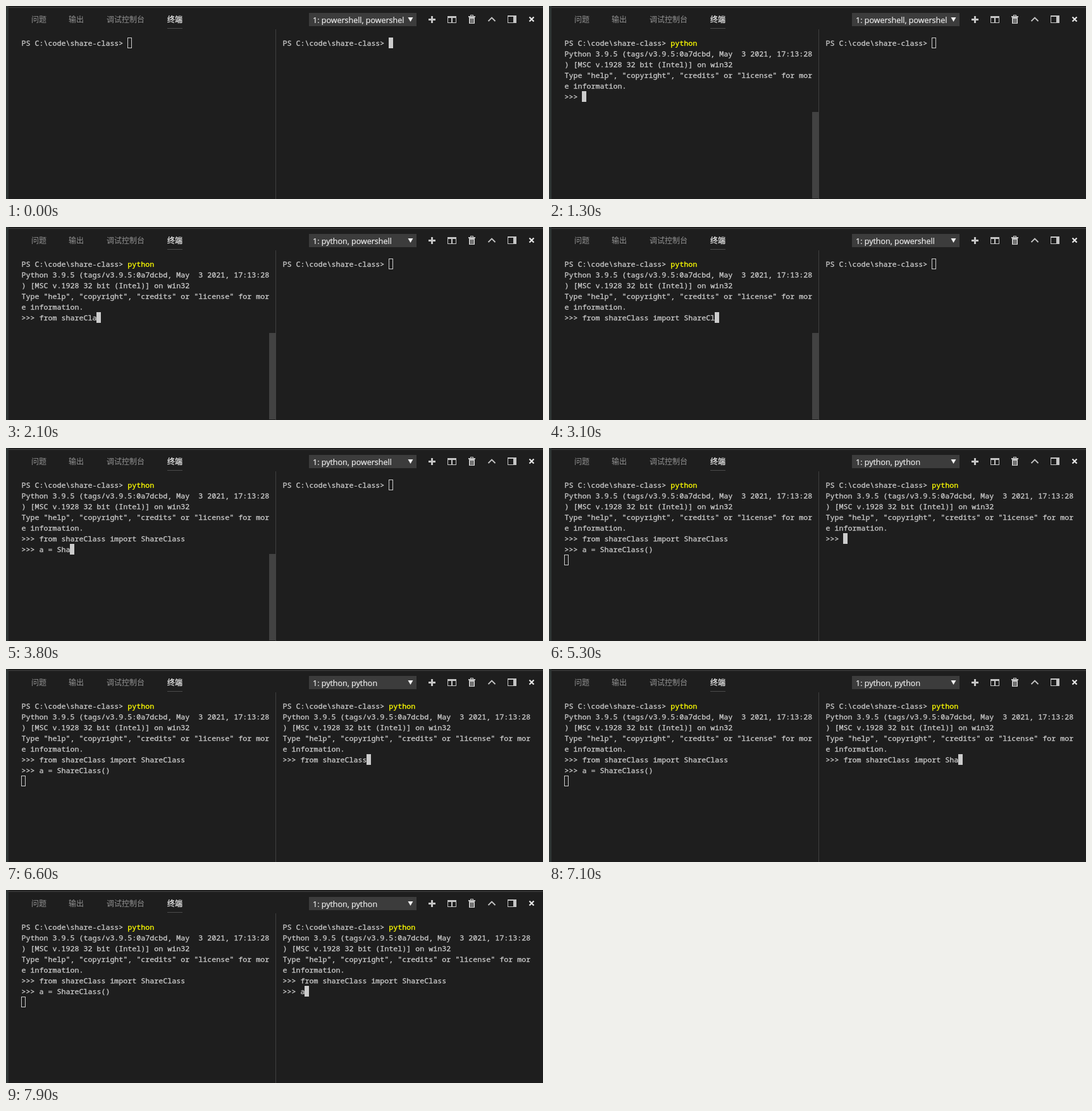
Write an HTML page that moves like this. It is 849 px wide and 306 px high and loops after 8000 ms.

```html
<!DOCTYPE html>
<html lang="zh">
<head>
<meta charset="utf-8">
<title>Split terminal</title>
<style>
html, body { margin: 0; width: 100%; height: 100%; overflow: hidden; background: #1e1e1e; }
svg { position: absolute; left: 0; top: 0; }
.tabs { font: 12px "Noto Sans CJK SC", "Noto Sans CJK", "Noto Sans CJK JP", sans-serif; fill: #929292; }
.tabs .on { fill: #e7e7e7; stroke: #e7e7e7; stroke-width: .3px; }
#title {
  font: 12.5px "Open Sans", "Noto Sans", sans-serif;
  fill: #f0f0f0; stroke: #f0f0f0; stroke-width: .2px;
}
.pane {
  position: absolute; top: 50px; margin: 0; width: 400px; height: 256px;
  font: 11.6667px/17px "Noto Sans Mono", "DejaVu Sans Mono", monospace;
  color: #ccc; white-space: pre; font-variant-ligatures: none;
  -webkit-text-stroke: .3px currentColor;
}
.pane span, .pane b { position: relative; left: .5px; }
.pane b { font-weight: normal; color: #ff0; }
.pane i {
  display: inline-block; vertical-align: top; box-sizing: border-box;
  width: 7px; height: 17px; border: 1px solid #ccc;
}
.pane.focus i { background: #ccc; }
#left { left: 24px; }
#right { left: 437px; }
#bar { position: absolute; left: 416px; top: 168px; width: 10px; height: 137px; background: #424242; }
</style>
</head>
<body>
<svg width="849" height="306" viewBox="0 0 849 306">
  <rect width="4" height="306" fill="#2f3534"/>
  <path d="M4 2h845v1H4zM426 37h1v269h-1z" fill="#414141"/>
  <g class="tabs">
    <text x="40" y="25.5">问题</text>
    <text x="99" y="25.5">输出</text>
    <text x="159" y="25.5">调试控制台</text>
    <text x="255" y="25.5" class="on">终端</text>
  </g>
  <rect x="255" y="35" width="24" height="1" fill="#4b4b4b"/>
  <rect x="479" y="11" width="170" height="21" fill="#3c3c3c"/>
  <clipPath id="clip"><rect x="479" y="11" width="151" height="21"/></clipPath>
  <g clip-path="url(#clip)"><text id="title" x="485" y="27"></text></g>
  <path d="M635.5 18h8l-4 7z" fill="#f0f0f0"/>
  <g fill="#c5c5c5" fill-rule="evenodd">
    <path d="M672 16h3v4h4v3h-4v4h-3v-4h-4v-3h4z"/>
    <path d="M698 16h14v11h-14zM699 19v7h5v-7zM706 19v7h5v-7z"/>
    <path d="M734 14h5v2h3v2h-1v10h-9v-10h-1v-2h3zM735 15v1h3v-1zM734 20v7h1v-7zM736 20v7h1v-7zM738 20v7h1v-7z"/>
    <path d="M793 15h14v12h-14zM794 17v9h8v-9z"/>
  </g>
  <path d="M762.5 24l5.5-5.5 5.5 5.5" fill="none" stroke="#c5c5c5" stroke-width="1.9"/>
  <path d="M827.5 17.5l7 7m0-7l-7 7" stroke="#e8e8e8" stroke-width="2.2"/>
</svg>
<div id="bar"></div>
<pre class="pane" id="left"><span></span><b></b><span></span><i></i></pre>
<pre class="pane" id="right"><span></span><b></b><span></span><i></i></pre>
<script>
const LOOP = 8000;
const TICK = 100;
const SPEED = 2.4; // characters per tick
const PROMPT = 'PS C:\\code\\share-class> ';
const BANNER = `
Python 3.9.5 (tags/v3.9.5:0a7dcbd, May  3 2021, 17:13:28
) [MSC v.1928 32 bit (Intel)] on win32
Type "help", "copyright", "credits" or "license" for mor
e information.
>>> `;

// Bursts of [start time, text]; output, which opens with a newline, appears at once.
const left = {
  el: document.getElementById('left'),
  command: [[1000, 'py'], [1200, 'thon']],
  session: [
    [1300, BANNER],
    [1500, 'from shareC'], [2100, 'lass '], [2400, 'import Share'], [3100, 'Class'],
    [3400, '\n>>> '],
    [3500, 'a = S'], [3800, 'ha'], [4000, 're'], [4200, 'Class()'],
    [4600, '\n']
  ]
};
const right = {
  el: document.getElementById('right'),
  command: [[4800, 'py'], [5100, 'th'], [5300, 'on']],
  session: [
    [5300, BANNER],
    [5700, 'from '], [6100, 'share'], [6500, 'Class import Sha'], [7300, 'reClass'],
    [7900, '\n>>> '],
    [7900, 'a']
  ]
};

const title = document.getElementById('title');
const bar = document.getElementById('bar');

function typed(bursts, t) {
  return bursts.map(([start, text]) => {
    if (t < start) return '';
    if (text[0] === '\n') return text;
    const ticks = Math.floor((t - start) / TICK) + 1;
    return text.slice(0, Math.round(ticks * SPEED));
  }).join('');
}

function setText(el, text) {
  if (el.textContent !== text) el.textContent = text;
}

function drawPane(pane, t, focus) {
  const [prompt, command, rest] = pane.el.children;
  setText(prompt, PROMPT);
  setText(command, typed(pane.command, t));
  setText(rest, typed(pane.session, t));
  pane.el.classList.toggle('focus', focus);
}

function draw() {
  const t = performance.now() % LOOP;
  const onLeft = t >= 300 && t < 4600;
  drawPane(left, t, onLeft);
  drawPane(right, t, !onLeft);
  const shell = since => t >= since ? 'python' : 'powershell';
  setText(title, `1: ${shell(1500)}, ${shell(5300)}`);
  bar.style.opacity = t < 300 || t >= 4900 ? 0 : t < 4800 ? 1 : 0.5;
  requestAnimationFrame(draw);
}
draw();
</script>
</body>
</html>
```
